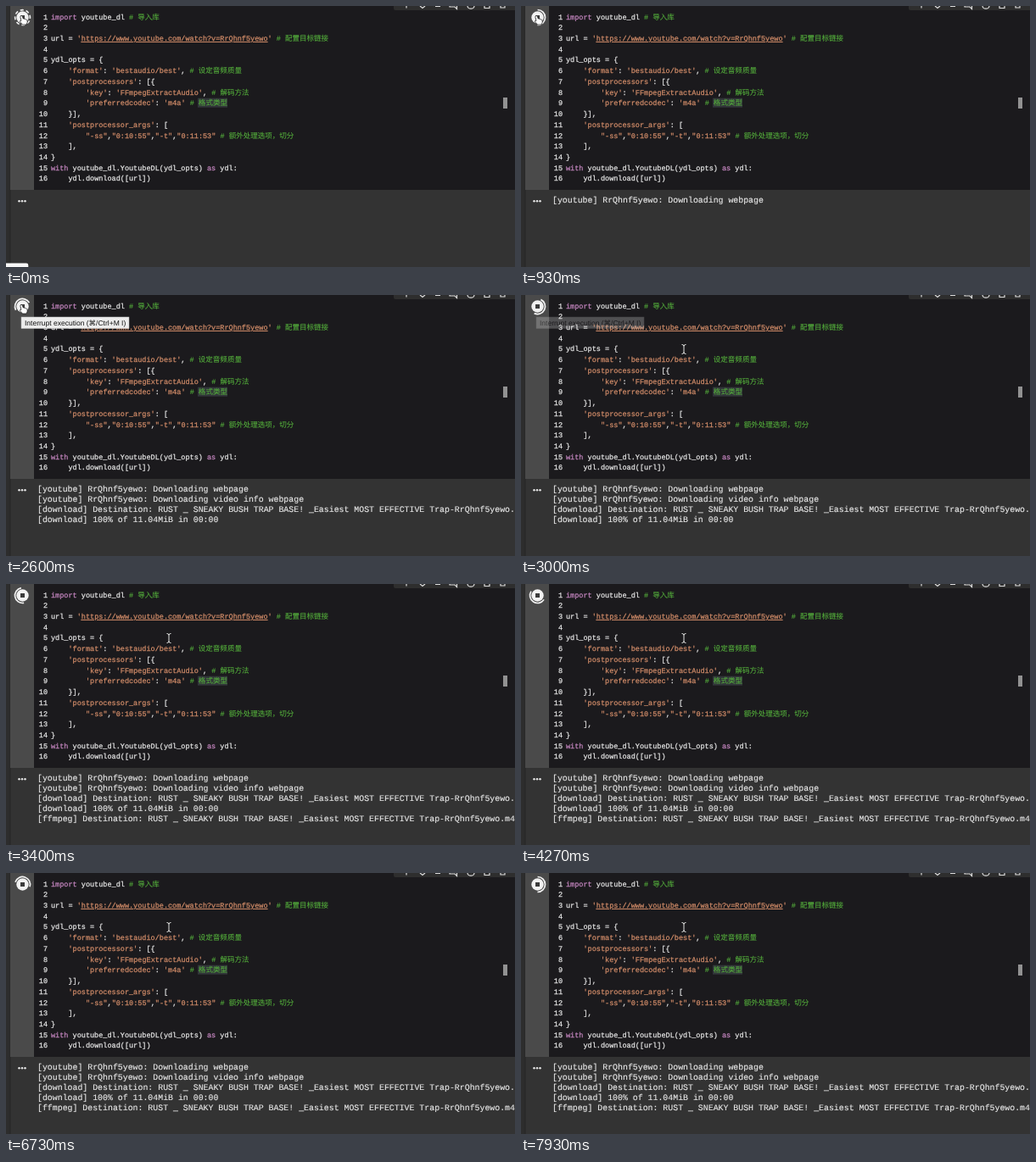
Write an HTML page that moves like this. It is 600 by 308 pixels and loops after 8 s.

```html
<!DOCTYPE html>
<html lang="zh">
<head>
<meta charset="utf-8">
<title>Notebook cell</title>
<style>
html, body { margin: 0; width: 100%; height: 100%; overflow: hidden; background: #333; }
svg { display: block; width: 600px; height: 308px; }
text { white-space: pre; text-rendering: geometricPrecision;
  font-family: "Liberation Mono", "Noto Sans CJK SC", "Noto Sans CJK", monospace; }
#code, #code tspan { fill: currentColor; stroke: currentColor; }
#code { font-size: 8.53px; color: #e6e6e6; stroke-width: .25px; }
#out { font-size: 9.88px; fill: #e8e8e8; stroke: #e8e8e8; stroke-width: .15px; }
.k { color: #c586c0; }
.s { color: #d08b68; }
.u { color: #d08b68; text-decoration: underline; }
#code .c { color: #55b03c; stroke-width: .08px; }
#tip text { font: 8.5px "Liberation Sans", "DejaVu Sans", sans-serif; fill: #111; }
</style>
</head>
<body>
<svg viewBox="0 0 600 308">
  <rect width="600" height="308" fill="#333"/>
  <rect width="5" height="308" fill="#2d2d2d"/>
  <rect x="4.5" width="1" height="308" fill="#272727"/>
  <rect x="5" width="28" height="217" fill="#4a4a4a"/>
  <rect x="33" width="567" height="217" fill="#1b1a1d"/>
  <rect x="226" y="108.7" width="35" height="11" fill="#32363a"/>
  <rect x="586" y="108" width="5" height="13" fill="#929292"/>

  <g id="tools" fill="none" stroke="#dcdcdc" stroke-width="1.2">
    <path d="M457 0V3q0 2 2 2H600V0z" fill="#2e2e2e" stroke="none"/>
    <path d="M472 0V2.5M488 0l3 2.5 3-2.5M506 .5h6"/>
    <path d="M523 0V1h6l2.5 2.5V0"/>
    <path d="M544 0a3.8 3 0 0 0 8 0"/>
    <path d="M564 0V2.5h6V0"/>
    <path d="M583 0V2h5V0"/>
  </g>

  <g id="code"></g>
  <g fill="#e6e6e6">
    <circle cx="15.5" cy="230.2" r="1.25"/>
    <circle cx="19" cy="230.2" r="1.25"/>
    <circle cx="22.5" cy="230.2" r="1.25"/>
  </g>
  <clipPath id="clip"><rect id="frame" x="33" y="217" width="567" height="25"/></clipPath>
  <g id="out" clip-path="url(#clip)"></g>

  <g transform="translate(19.5 13.5)">
    <circle r="7.2" fill="#f2f2f2"/>
    <rect x="-2.5" y="-2.5" width="5" height="5" fill="#3c3c3c"/>
    <circle id="dash" r="8.9" fill="none" stroke="#f2f2f2" stroke-width="1.6" stroke-dasharray="4 2.99"/>
    <path id="arc" d="M0-9A9 9 0 0 1 0 9" fill="none" stroke="#f2f2f2" stroke-width="1.7"/>
  </g>

  <g id="tip">
    <rect x="18" y="26" width="127" height="13.5" fill="#ececec" stroke="#bbb" stroke-width=".5"/>
    <text x="22" y="36">Interrupt execution (⌘/Ctrl+M I)</text>
  </g>

  <path id="hand" d="M17.4 11.8q1.3-.9 1.9.5l.9 2.7q1.2-.5 1.7.4 1.2-.4 1.6.6 1.4-.2 1.6 1.2v2.2l-1 2.6h-4.6l-3.2-3.6q-.2-1.4 1.6-.8l-1-4.6q0-.8.5-1.2z"
    fill="#fff" stroke="#111" stroke-width=".7"/>
  <g id="beam" fill="none">
    <path d="M-2.5-5.5Q0-5.5 0-3.8 0-5.5 2.5-5.5M0-4V4M-2.5 5.5Q0 5.5 0 3.8 0 5.5 2.5 5.5" stroke="#111" stroke-width="2"/>
    <path d="M-2.5-5.5Q0-5.5 0-3.8 0-5.5 2.5-5.5M0-4V4M-2.5 5.5Q0 5.5 0 3.8 0 5.5 2.5 5.5" stroke="#eee" stroke-width="1"/>
  </g>
  <path id="status" d="M0 303.6H24q2.3 0 2.3 2.3V308H0z" fill="#f8f8f8"/>
</svg>
<script>
const LOOP = 8000;
const $ = id => document.getElementById(id);
const esc = s => s.replace(/&/g, "&amp;").replace(/</g, "&lt;");

// Each line: indent, then pairs of class and text.
const code = [
  [0, "k", "import", "", " youtube_dl ", "c", "# 导入库"],
  [0],
  [0, "", "url = ", "s", "'", "u", "https://www.youtube.com/watch?v=RrQhnf5yewo", "s", "'", "", " ", "c", "# 配置目标链接"],
  [0],
  [0, "", "ydl_opts = {"],
  [4, "s", "'format'", "", ": ", "s", "'bestaudio/best'", "", ", ", "c", "# 设定音频质量"],
  [4, "s", "'postprocessors'", "", ": [{"],
  [8, "s", "'key'", "", ": ", "s", "'FFmpegExtractAudio'", "", ", ", "c", "# 解码方法"],
  [8, "s", "'preferredcodec'", "", ": ", "s", "'m4a'", "", " ", "c", "# 格式类型"],
  [4, "", "}],"],
  [4, "s", "'postprocessor_args'", "", ": ["],
  [8, "s", '"-ss"', "", ",", "s", '"0:10:55"', "", ",", "s", '"-t"', "", ",", "s", '"0:11:53"', "", " ", "c", "# 额外处理选项，切分"],
  [4, "", "],"],
  [0, "", "}"],
  [0, "k", "with", "", " youtube_dl.YoutubeDL(ydl_opts) ", "k", "as", "", " ydl:"],
  [4, "", "ydl.download([url])"]
];

$("code").innerHTML = code.map(([indent, ...parts], i) => {
  const y = (15.6 + i * 12.72).toFixed(2);
  let spans = "";
  for (let j = 0; j < parts.length; j += 2)
    spans += `<tspan class="${parts[j]}">${esc(parts[j + 1])}</tspan>`;
  return `<text x="49" y="${y}" text-anchor="end">${i + 1}</text>` +
    `<text x="${53 + indent * 5.12}" y="${y}">${spans}</text>`;
}).join("");

const title = "RUST _ SNEAKY BUSH TRAP BASE! _Easiest MOST EFFECTIVE Trap-RrQhnf5yewo.m4a";
// Time of appearance and text.
const log = [
  [530, "[youtube] RrQhnf5yewo: Downloading webpage"],
  [1930, "[youtube] RrQhnf5yewo: Downloading video info webpage"],
  [2530, "[download] Destination: " + title],
  [2600, "[download] 100% of 11.04MiB in 00:00"],
  [3270, "[ffmpeg] Destination: " + title]
];
$("out").innerHTML = log.map(([, s], i) =>
  `<text x="37" y="${232.2 + i * 12}">${esc(s)}</text>`).join("");
const rows = [...$("out").children];

const clamp = v => Math.max(0, Math.min(1, v));
const show = (el, on) => el.setAttribute("visibility", on ? "visible" : "hidden");

function draw(t) {
  const angle = (t - 930) * 0.36;
  const pending = t < 330;
  show($("dash"), pending);
  show($("arc"), !pending);
  $("dash").setAttribute("transform", `rotate(${angle})`);
  $("arc").setAttribute("transform", `rotate(${angle})`);

  show($("status"), t < 400);
  rows.forEach((row, i) => show(row, t >= log[i][0]));
  $("frame").setAttribute("height", t < 2400 ? 25 : 91);

  $("tip").setAttribute("opacity", t < 1470 ? 0 : 1 - clamp((t - 2800) / 270));

  const p = clamp((t - 2690) / 240);
  const ease = p * p * (3 - 2 * p);
  show($("hand"), p === 0);
  show($("beam"), p > 0);
  $("beam").setAttribute("transform", `translate(${20 + 172 * ease} ${16 + 48 * ease})`);
}

const start = performance.now();
function tick() {
  draw((performance.now() - start) % LOOP);
  requestAnimationFrame(tick);
}
tick();
</script>
</body>
</html>
```
